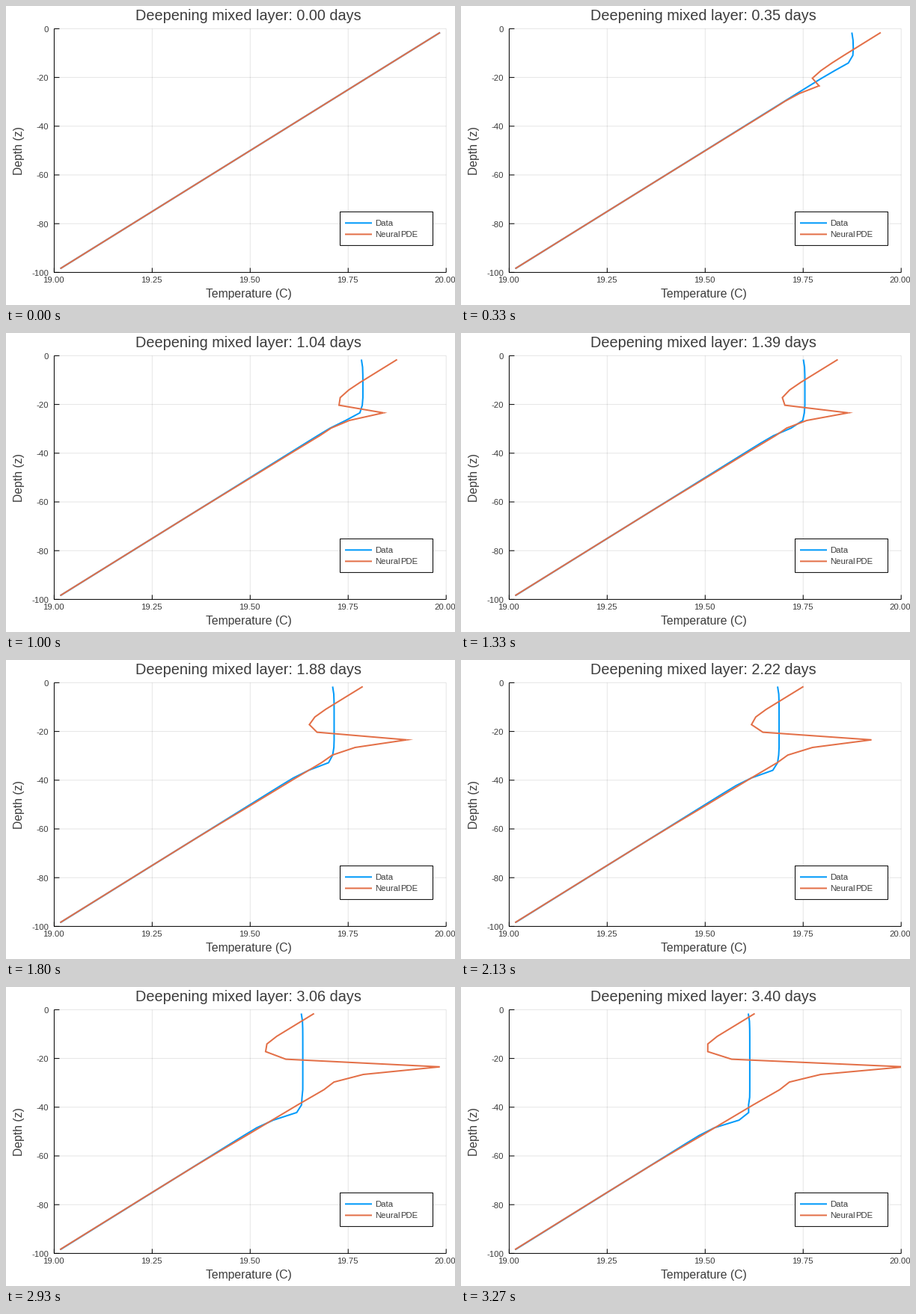
Animation, 600 px wide and 400 px high, one loop 3340 ms. Source, as a matplotlib script:

```python
import numpy as np
import matplotlib.pyplot as plt
from matplotlib.animation import FuncAnimation
from matplotlib.patches import Polygon, Rectangle

WIDTH, HEIGHT, DPI = 600, 400, 100
PT = 72 / DPI
LEFT, RIGHT, TOP, BOTTOM = 64.4, 588.2, 30.4, 356.4
PX_PER_DEG = RIGHT - LEFT
BLUE, ORANGE, INK = "#009afa", "#e36f47", "#3c3c3c"

TICK_MS, TICKS, STEPS = 20, 167, 50
DAYS_PER_STEP = 100 / 1440

# 32 cell centres over a depth of 100 m
cell = np.arange(32)
depth_y = TOP + (cell + 0.5) * (BOTTOM - TOP) / 32
start_x = RIGHT - (cell + 0.5) * PX_PER_DEG / 32
# drift of the neural solution by cell, in pixels per day
drift = np.interp(cell, list(range(13)) + [16, 18, 20, 24, 31],
                  [-55.1, -55.2, -55.3, -55.4, -54.3, -49.5, -35.3, 37.4, 9.3,
                   1.8, 2.8, 2.4, 2.0, 1.1, 0.5, 0.1, -0.1, -0.15])

plt.rcParams["font.family"] = "Liberation Sans"
fig = plt.figure(figsize=(WIDTH / DPI, HEIGHT / DPI), dpi=DPI, facecolor="white")
ax = fig.add_axes([0, 0, 1, 1])
ax.set_xlim(0, WIDTH)
ax.set_ylim(HEIGHT, 0)
ax.axis("off")


def segment(xs, ys, color="black", width=1.0, **kwargs):
    return ax.plot(xs, ys, color=color, lw=width * PT, snap=False,
                   solid_capstyle="butt", solid_joinstyle="miter", **kwargs)[0]


def label(x, y, text, size, ha="center", **kwargs):
    return ax.text(x, y, text, fontsize=size * PT, ha=ha, va="baseline",
                   color=INK, **kwargs)


def draw_axes():
    for k in range(5):
        x = LEFT + k * PX_PER_DEG / 4
        segment([x, x], [TOP, BOTTOM], alpha=0.1)
        segment([x, x], [BOTTOM, BOTTOM - 6])
        label(x - 1.2, 370, f"{19 + k / 4:.2f}", 11.43)
    for k in range(6):
        y = TOP + k * (BOTTOM - TOP) / 5
        segment([LEFT, RIGHT], [y, y], alpha=0.1)
        segment([LEFT, LEFT + 7], [y, y])
        label(57, y + 4.4, f"{-20 * k}", 11.43, ha="right")
    segment([LEFT, LEFT, RIGHT], [TOP, BOTTOM, BOTTOM])
    label(324.5, 390, "Temperature (C)", 15.7)
    label(22, 193.5, "Depth (z)", 15.7, rotation=90, rotation_mode="anchor")


def draw_legend():
    ax.add_patch(Rectangle((446.5, 275.4), 124, 45, fc="white", ec="black",
                           lw=PT, snap=False, zorder=5))
    for y, color in ((290.3, BLUE), (305.4, ORANGE)):
        segment([453, 489], [y, y], color, 2, zorder=6)
    label(493, 294.4, "Data", 11.43, ha="left", zorder=6)
    label(493, 309.4, "Neural", 11.43, ha="left", zorder=6)
    label(527.3, 309.4, "PDE", 11.43, ha="left", zorder=6)


def mixed_layer(days):
    """Convective layer deepening about as sqrt(time) into a linear gradient."""
    slope = PX_PER_DEG / 32
    mixed_x = RIGHT - 109 * days ** 0.505
    base = (start_x[0] - mixed_x) / slope
    below = cell - base
    edge = below - 0.2 * (base + 0.5)
    onset = 1 - np.exp(-days / 0.05)
    weight = onset / (1 + np.exp(2.8 * (edge + 0.2)))
    blended = mixed_x - (1 - weight) * slope * np.maximum(below, 0)
    dip = 1.8 * np.exp(-((below - 0.4) / 0.8) ** 2)
    skin = 2 * np.exp(-1.5 * cell)
    return blended - onset * (dip + skin)


def spike_tip(x, limit=10, half=1.0):
    """Mitred point at the warm spike; collapses when too sharp."""
    a, p, b = (np.array([x[i], depth_y[i]]) for i in (6, 7, 8))
    d1 = (p - a) / np.hypot(*(p - a))
    d2 = (b - p) / np.hypot(*(b - p))
    out = d1 - d2
    size = np.hypot(*out)
    sin_half = np.sqrt(max(0, 1 - (size / 2) ** 2))
    if size < 1.5 or sin_half < 1 / limit:
        return np.array([p, p, p])
    n1 = np.array([d1[1], -d1[0]]) * half
    n2 = np.array([d2[1], -d2[0]]) * half
    return np.array([p + n1, p + out / size * half / sin_half, p + n2])


draw_axes()
draw_legend()
title = label(324.2, 19, "", 19.9)
data_line = segment([], [], BLUE, 2, zorder=3)
neural_line = segment([], [], ORANGE, 2, zorder=4)
tip = ax.add_patch(Polygon(np.zeros((3, 2)), fc=ORANGE, lw=0, zorder=4))
plot_area = Rectangle((LEFT, TOP), RIGHT - LEFT, BOTTOM - TOP,
                      transform=ax.transData)
for artist in (data_line, neural_line, tip):
    artist.set_clip_path(plot_area)


def update(tick):
    # steps run at 15 per second
    step = min(STEPS - 1, (4 * tick + 3) * 3 // 40)
    days = step * DAYS_PER_STEP
    neural_x = start_x + drift * days
    title.set_text(f"Deepening mixed layer: {step * 100 / 1440:.2f} days")
    data_line.set_data(mixed_layer(days), depth_y)
    neural_line.set_data(neural_x, depth_y)
    tip.set_xy(spike_tip(neural_x))
    return title, data_line, neural_line, tip


anim = FuncAnimation(fig, update, frames=TICKS, interval=TICK_MS, repeat=True,
                     repeat_delay=0)
plt.show()
```
